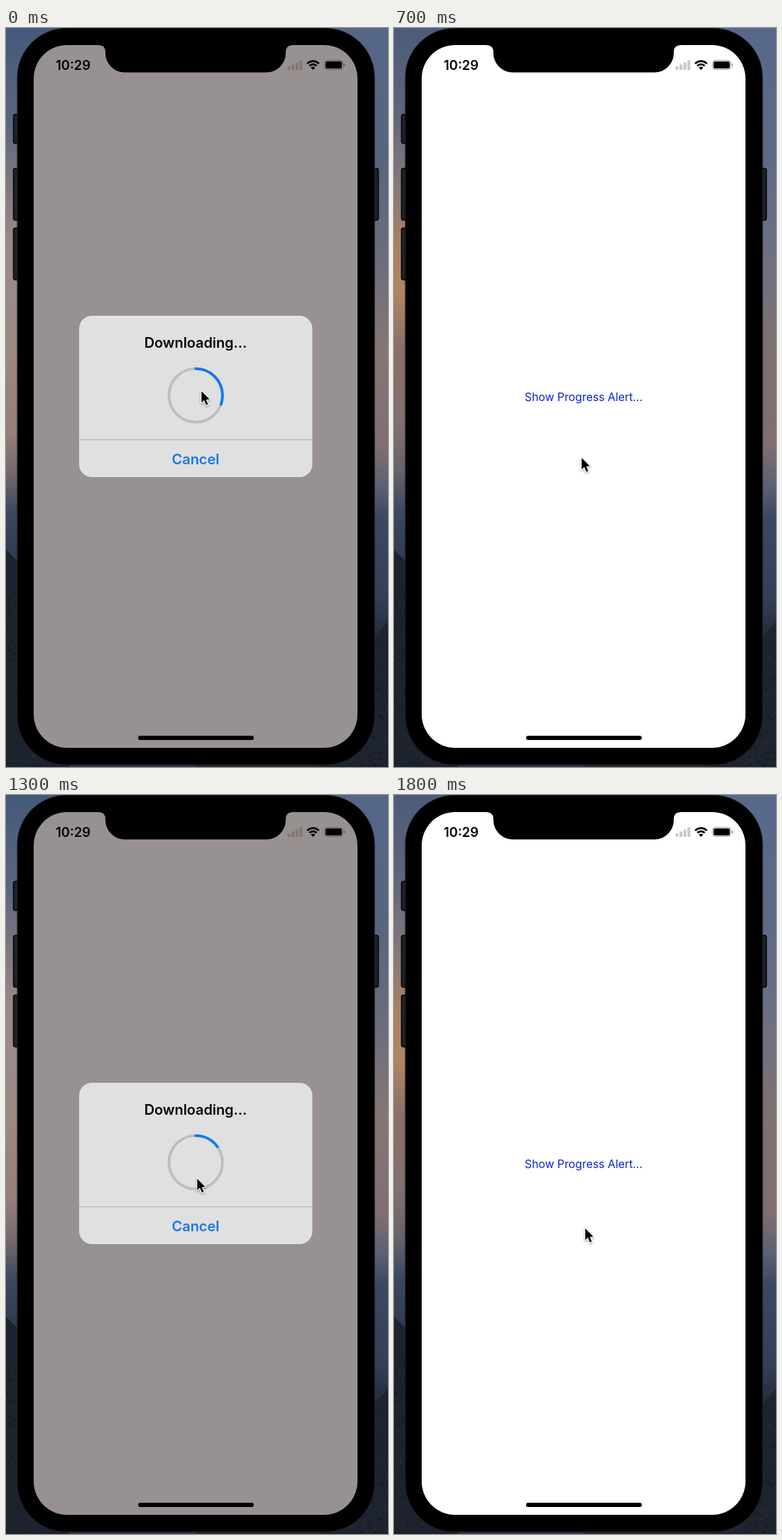
Write an HTML page with a canvas that moves like this. It is 538 px wide and 1040 px high and loops after 2 s.

```html
<!DOCTYPE html>
<html lang="en">
<head>
<meta charset="utf-8">
<title>Progress alert</title>
<style>
  html, body { margin: 0; width: 100%; height: 100%; overflow: hidden; background: #000; }
  canvas { display: block; width: 538px; height: 1040px; }
</style>
</head>
<body>
<canvas id="stage" width="538" height="1040"></canvas>
<script>
const ctx = document.getElementById('stage').getContext('2d');
const LOOP = 2000, STEP = 100;
const BLUE = '#0f7bed', MUTED = '#9098a1';

const ease = p => p * p * (3 - 2 * p);
const mix = (a, b, p) => a + (b - a) * p;
const span = (t, from, to) => Math.min(1, Math.max(0, (t - from) / (to - from)));

function box(x, y, w, h, r, fill, stroke, lineWidth = 1) {
  ctx.beginPath();
  ctx.roundRect(x, y, w, h, r);
  if (fill) { ctx.fillStyle = fill; ctx.fill(); }
  if (stroke) { ctx.strokeStyle = stroke; ctx.lineWidth = lineWidth; ctx.stroke(); }
}

function label(text, x, y, weight, size, color, align = 'center', spacing = 0) {
  ctx.font = `${weight} ${size}px Inter, sans-serif`;
  ctx.letterSpacing = spacing + 'px';
  ctx.textAlign = align;
  ctx.fillStyle = color;
  ctx.fillText(text, x, y);
}

function polygon(points, color) {
  ctx.beginPath();
  points.forEach(([x, y]) => ctx.lineTo(x, y));
  ctx.closePath();
  ctx.fillStyle = color;
  ctx.fill();
}

// Wallpaper strips: [height, colour] stops for each mood of the backdrop.
const SKIES = {
  idle: {
    left: [[0, '#4c5c7a'], [110, '#5b657e'], [210, '#81777d'], [310, '#ad7f62'], [370, '#b38460'],
      [450, '#8b7068'], [560, '#80706f'], [620, '#69636c'], [680, '#3a4961'], [760, '#2c394e']],
    right: [[0, '#58688a'], [180, '#5e6b86'], [330, '#6f7082'], [460, '#80706f'], [590, '#806e70'],
      [645, '#5d6074'], [690, '#3b4861'], [800, '#344058'], [860, '#232a38']]
  },
  dim: {
    left: [[0, '#46597a'], [130, '#5a6680'], [220, '#81787f'], [310, '#9b8c8b'], [470, '#9a8783'],
      [570, '#947f7b'], [630, '#73676c'], [680, '#3a4961'], [760, '#2c394e']],
    right: [[0, '#556686'], [180, '#56647f'], [330, '#6d6d7c'], [450, '#857675'], [590, '#806e70'],
      [645, '#5d6074'], [690, '#3b4861'], [800, '#344058'], [860, '#232a38']]
  },
  fade: {
    left: [[0, '#4b6088'], [150, '#566582'], [225, '#86858a'], [290, '#999999'], [580, '#989696'],
      [640, '#716769'], [690, '#35435a'], [760, '#2a364a']],
    right: [[0, '#8f939a'], [70, '#687692'], [210, '#566480'], [310, '#77747e'], [410, '#989493'],
      [570, '#8d8382'], [640, '#5d6074'], [690, '#3b4861'], [800, '#344058'], [860, '#232a38']]
  }
};

function strip(x, stops) {
  const paint = ctx.createLinearGradient(0, 0, 0, 1040);
  stops.forEach(([y, color]) => paint.addColorStop(y / 1040, color));
  ctx.fillStyle = paint;
  ctx.fillRect(x, 0, 269, 1040);
}

function wallpaper(mood) {
  strip(0, SKIES[mood].left);
  strip(269, SKIES[mood].right);
  polygon([[0, 734], [20, 754], [90, 820], [90, 1040], [0, 1040]], '#1d232e');
  polygon([[538, 835], [510, 868], [440, 1040], [538, 1040]], '#1e242f');

  // Rough forest on the lower slopes
  let seed = 7;
  const random = () => (seed = (seed * 16807) % 2147483647) / 2147483647;
  for (let i = 0; i < 900; i++) {
    const y = 790 + random() * 250;
    const across = random() * 55;
    const tone = 14 + random() * 32;
    const x = i % 2 ? across : 538 - across;
    if (i % 2 || y > 860) {
      ctx.fillStyle = `rgba(${tone}, ${tone + 4}, ${tone + 12}, 0.55)`;
      ctx.fillRect(x, y, 1 + random() * 3, 1 + random() * 3);
    }
  }
}

function phone(screenColor) {
  [[10, 121, 42], [10, 197, 74], [10, 281, 74], [515, 197, 74]].forEach(([x, y, h]) =>
    box(x + 0.5, y + 0.5, 9, h - 1, 3, '#1d2227', '#060708', 1.5));
  box(16, 0.5, 503, 1036.5, 69, '#000', '#191b1f');
  box(39, 24, 456, 989, 47, screenColor);

  ctx.beginPath();
  ctx.moveTo(130, 23);
  ctx.lineTo(130, 24);
  ctx.quadraticCurveTo(140, 24, 140, 34);
  ctx.arcTo(140, 62.5, 170, 62.5, 27);
  ctx.arcTo(394, 62.5, 394, 34, 27);
  ctx.lineTo(394, 34);
  ctx.quadraticCurveTo(394, 24, 404, 24);
  ctx.lineTo(404, 23);
  ctx.fillStyle = '#000';
  ctx.fill();
  box(186, 996, 163, 6, 3, '#000');
}

function statusBar(barColor, rimColor) {
  label('10:29', 70, 59, 600, 18.4, '#000', 'left');
  for (let i = 0; barColor && i < 4; i++) {
    const h = 5 + i * 2.8;
    box(396.5 + i * 5.6, 59 - h, 4, h, 1, barColor);
  }

  ctx.strokeStyle = '#000';
  ctx.lineWidth = 2.7;
  ctx.lineCap = 'butt';
  [7.2, 11.7].forEach(r => {
    ctx.beginPath();
    ctx.arc(432.4, 58.4, r, -Math.PI * 0.75, -Math.PI * 0.25);
    ctx.stroke();
  });
  ctx.beginPath();
  ctx.moveTo(432.4, 59);
  ctx.arc(432.4, 58.8, 4.4, -Math.PI * 0.75, -Math.PI * 0.25);
  ctx.fillStyle = '#000';
  ctx.fill();

  box(448.5, 45.5, 26, 13, 4, null, rimColor);
  box(450, 47, 23, 10, 2.5, '#000');
  box(475.8, 50, 1.6, 4, 1, rimColor);
}

function ring(from, to, color) {
  ctx.beginPath();
  ctx.arc(267.2, 517, 37.7, from, to);
  ctx.strokeStyle = color;
  ctx.lineWidth = 3.8;
  ctx.stroke();
}

function alertBox({ progress, muted, checked, scale }) {
  const tint = muted ? MUTED : BLUE;
  ctx.save();
  ctx.translate(267, 518.5);
  ctx.scale(scale, scale);
  ctx.translate(-267, -518.5);

  box(103, 405, 328.5, 227, 18, '#e0e0e0');
  ctx.fillStyle = '#adadad';
  ctx.fillRect(103, 579, 328.5, 1);
  label('Downloading...', 267, 450, 600, 20, scale < 1 ? '#16111f' : '#080808', 'center', -0.1);
  label('Cancel', 267, 613.7, 600, 20, muted ? '#909bab' : '#1b77e3');

  ctx.lineCap = 'round';
  ctx.lineJoin = 'round';
  ring(0, Math.PI * 2, '#bdbdbd');
  ring(-Math.PI / 2, Math.PI * (2 * progress - 0.5), tint);
  if (checked) {
    ctx.beginPath();
    ctx.moveTo(257.8, 518);
    ctx.lineTo(264.3, 526.3);
    ctx.lineTo(277, 507.7);
    ctx.lineWidth = 3.6;
    ctx.stroke();
  }
  ctx.restore();
}

function cursor(x, y) {
  ctx.save();
  ctx.translate(x, y);
  ctx.beginPath();
  [[0.3, 0], [0.3, 16.2], [4, 12.8], [7, 19.6], [9.6, 18.4], [6.7, 11.9], [11.7, 11.6]]
    .forEach(([px, py]) => ctx.lineTo(px, py));
  ctx.closePath();
  ctx.lineJoin = 'round';
  ctx.lineWidth = 2.4;
  ctx.strokeStyle = '#fff';
  ctx.shadowColor = 'rgba(0, 0, 0, 0.35)';
  ctx.shadowBlur = 3;
  ctx.shadowOffsetY = 1.5;
  ctx.stroke();
  ctx.shadowColor = 'transparent';
  ctx.fillStyle = '#000';
  ctx.fill();
  ctx.restore();
}

function cursorAt(t) {
  const glide = (from, to, p) => from.map((v, i) => mix(v, to[i], ease(p)));
  if (t < 700) return glide([275, 511], [264, 605], span(t, 0, 600));
  if (t < 1300) return glide([264, 605], [269, 521], span(t, 700, 1200));
  return glide([269, 540], [269, 610], span(t, 1300, 1700));
}

// Progress grows by 15% per step; the first run completes, the second is cancelled.
function alertAt(t) {
  if (t < 700) {
    return { progress: Math.min(1, 0.304 + t * 0.0015), checked: t >= 500, muted: t >= 600, scale: 1 };
  }
  if (t < 1300 || t >= 1800) return null;
  const closing = t >= 1700;
  return {
    progress: closing ? 1 : 0.151 + (t - 1300) * 0.0015,
    checked: false, muted: closing, scale: closing ? 0.968 : 1
  };
}

function draw(t) {
  const state = alertAt(t);
  const closing = state && state.scale < 1;
  wallpaper(closing ? 'fade' : state ? 'dim' : 'idle');
  phone(closing ? '#999999' : state ? '#979291' : '#fff');
  statusBar(closing ? null : state ? '#837675' : '#c9c9c9', state ? '#625e5d' : '#9a9a9a');
  if (state) alertBox(state);
  else label('Show Progress Alert...', 267, 524.7, 400, 15.8, '#0b22d2');
  cursor(...cursorAt(t));
}

function tick() {
  const t = performance.now() % LOOP;
  draw(Math.floor(t / STEP) * STEP);
  requestAnimationFrame(tick);
}
tick();
</script>
</body>
</html>
```
